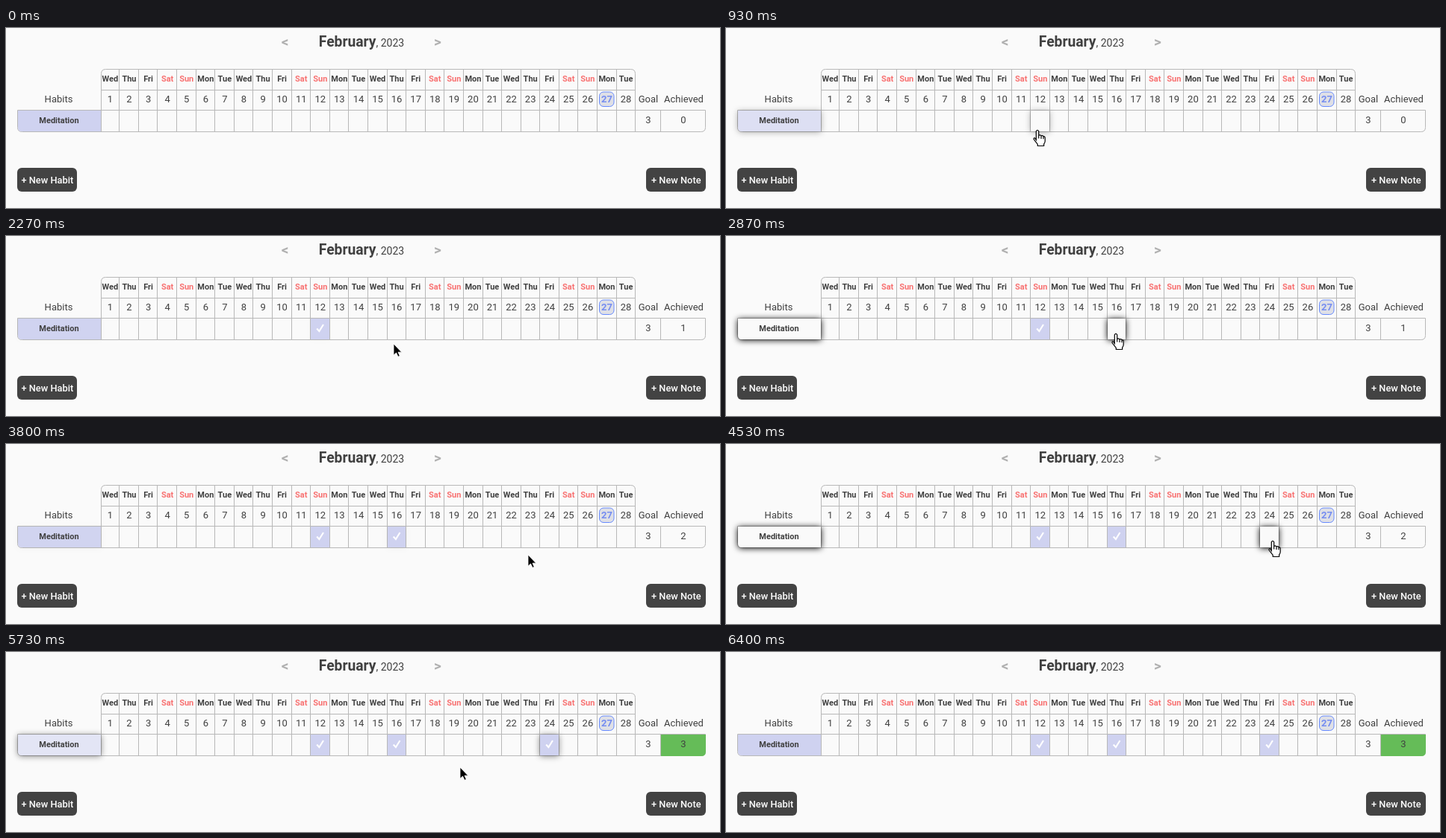
An HTML page for the animation above (7870 ms loop, 956x242 px).

```html
<!DOCTYPE html>
<html lang="en">
<head>
<meta charset="utf-8">
<title>Habit tracker</title>
<style>
html, body { margin: 0; width: 100%; height: 100%; overflow: hidden; background: #fafafa; }
svg { display: block; }
text { font: 13px Roboto, Arial, sans-serif; fill: #404040; text-anchor: middle; }
.bold { font-weight: bold; font-size: 11px; }
.month { font-weight: bold; font-size: 19.3px; }
.year { font-weight: normal; font-size: 14px; }
.arrow { font-weight: bold; font-size: 19px; fill: #b0b0b0; }
.weekend { fill: #f87171; }
.today { font-weight: bold; fill: #758cf0; }
.button { font-weight: 500; font-size: 12.8px; fill: #fff; }
.grid { fill: none; stroke: #b8b8b8; }
</style>
</head>
<body>
<svg id="stage" width="956" height="242"></svg>
<script>
const LOOP = 7870, STEP = 200 / 3, FADE = 530;
const PAPER = [250, 250, 250], LILAC = [207, 210, 240];
const stage = document.getElementById('stage');

function add(tag, attrs, content = '') {
  const el = document.createElementNS('http://www.w3.org/2000/svg', tag);
  for (const key in attrs) el.setAttribute(key, attrs[key]);
  el.textContent = content;
  return stage.appendChild(el);
}
const label = (x, y, content, cls = '') => add('text', { x, y, class: cls }, content);
const path = (d, attrs) => add('path', { d, ...attrs });
const columnX = i => Math.floor(126.125 + 25.594 * i);

// Title
label(373.5, 25, '<', 'arrow');
label(578, 25, '>', 'arrow');
label(476, 25, 'February', 'month').append(add('tspan', { class: 'year' }, ', 2023'));

// Table
let lines = 'M127.5 139V61.5q0-6 6-6H836.5q6 0 6 6V139M127.5 83.5H842.5' +
  'M15.5 110.5H936.5V133.5q0 6-6 6H21.5q-6 0-6-6ZM876.5 110.5V139.5';
for (let i = 1; i < 28; i++) lines += `M${columnX(i) + .5} 55.5V139.5`;
path(lines, { class: 'grid' });
const goalMet = path('M877 111H937V134q0 6-6 6H877Z', { fill: '#65bc58' });

add('rect', { x: 794.5, y: 86, width: 19.5, height: 19.5, rx: 5.5, fill: '#dfe0e6', stroke: '#668aff' });
const weekdays = ['Sun', 'Mon', 'Tue', 'Wed', 'Thu', 'Fri', 'Sat'];
for (let i = 0; i < 28; i++) {
  const x = 139.4 + 25.58 * i, day = (i + 3) % 7;
  label(x, 72, weekdays[day], day % 6 ? 'bold' : 'bold weekend');
  label(x, 100, i + 1, i === 26 ? 'today' : '');
}
label(70.5, 100, 'Habits');
label(860, 100, 'Goal');
label(907.5, 100, 'Achieved');
label(860, 128, 3);
const achieved = label(907, 128, 0);

// Pointer glides: from the last place to x, y; "power" bends the speed, "dip" the path
const origin = { x: 920, y: 233 };
const glides = [
  { start: 200, end: 900, x: 417, y: 137, dip: 0, power: 1.5 },
  { start: 1750, end: 2480, x: 522, y: 131, dip: 18, power: 3 },
  { start: 3330, end: 3970, x: 732, y: 130, dip: 25, power: 1.4 },
  { start: 5500, end: 6400, x: 95, y: 242, dip: 5, power: .72 }
];

// Highlighted boxes
const habit = path('M16 111H127V139H21q-5 0-5-5Z');
const cells = [[12, 1600], [16, 3130], [24, 4665]].map(([day, click], i) => {
  const x = columnX(day - 1) + 1, end = columnX(day);
  return {
    click, enter: glides[i].end - 80, leave: glides[i + 1].start + 70,
    box: add('rect', { x, y: 111, width: end - x, height: 28 }),
    tick: path(`M${(x + end) / 2 - 4.3} 124.5l3.2 3.5 5.6-9`,
      { fill: 'none', stroke: '#fff', 'stroke-width': 2.1 })
  };
});
label(71, 128, 'Meditation', 'bold');

// Buttons
for (const [x, name] of [[15, '+ New Habit'], [857, '+ New Note']]) {
  add('rect', { x, y: 188, width: 80, height: 32, rx: 6, fill: '#434343' });
  label(x + 40.3, 208.6, name, 'button');
}

// Pointers, with the hot spot at 0,0
const arrow = path('M0 0V15.2L3.5 12 6 17.3 8.3 16.3 6 11.2H10.7Z', { stroke: '#fff', 'stroke-width': .8 });
const hand = path('M-1.7 13.5V1.7Q0-1 1.7 1.7V7.5Q3.6 6 5 8 6.8 6.8 8 8.8 9.8 8.2 10.2 10.4V15' +
  'Q10.2 17.5 8.6 19V21.5H.3V19.5L-4.8 12.8Q-5.5 10.4-3.5 10.8Z' +
  'M1.7 7.5V11.5M5 8V12M8 8.8V12.3', { fill: '#fff', stroke: '#000', 'stroke-width': 1.2 });

const clamp = x => Math.min(1, Math.max(0, x));

function pointer(t) {
  let { x, y } = origin;
  for (const g of glides) {
    const u = clamp((t - g.start) / (g.end - g.start)), s = 1 - (1 - u) ** g.power;
    x += (g.x - x) * s;
    y += (g.y - y) * s + g.dip * Math.sin(Math.PI * u);
  }
  return [x, y];
}

// The standard "ease" curve: cubic-bezier(.25, .1, .25, 1)
function ease(x) {
  let lo = 0, hi = 1, s = .5;
  for (let n = 0; n < 20; n++) {
    s = (lo + hi) / 2;
    if (.75 * s * (1 - s) + s ** 3 < x) lo = s; else hi = s;
  }
  return .3 * s * (1 - s) ** 2 + 3 * s * s * (1 - s) + s ** 3;
}
const fade = (t, start) => ease(clamp((t - start) / FADE));
const mix = (a, b, p) => `rgb(${a.map((v, i) => Math.round(v + (b[i] - v) * p))})`;

function raise(el, p) {
  el.style.filter = p > .01 ? `drop-shadow(0 1.5px 4.5px rgba(0,0,0,${p}))` : 'none';
}

function draw(t) {
  let hover = 0, count = 0;
  for (const c of cells) {
    const lift = fade(t, c.enter) - fade(t, c.leave);
    hover += lift;
    if (t >= c.click) count++;
    c.box.setAttribute('fill', mix(PAPER, LILAC, fade(t, c.click)));
    c.tick.setAttribute('opacity', clamp((t - c.click) / FADE) ** 2);
    raise(c.box, lift);
  }
  habit.setAttribute('fill', mix(LILAC, PAPER, clamp(hover)));
  raise(habit, clamp(hover));
  achieved.textContent = count;
  goalMet.setAttribute('opacity', fade(t, cells[2].click));

  const [x, y] = pointer(t);
  const shown = t > 199 && t < 6390;
  const inRow = y > 110 && y < 139.5 && x > 127 && x < 842;
  for (const [el, on] of [[arrow, !inRow], [hand, inRow]]) {
    el.setAttribute('visibility', shown && on ? 'visible' : 'hidden');
    el.setAttribute('transform', `translate(${Math.round(x)} ${Math.round(y)})`);
  }
}

// The screen refreshes fifteen times a second
function tick() {
  const t = performance.now() % LOOP;
  draw(Math.floor((t + 5) / STEP) * STEP);
  requestAnimationFrame(tick);
}
tick();
</script>
</body>
</html>
```
